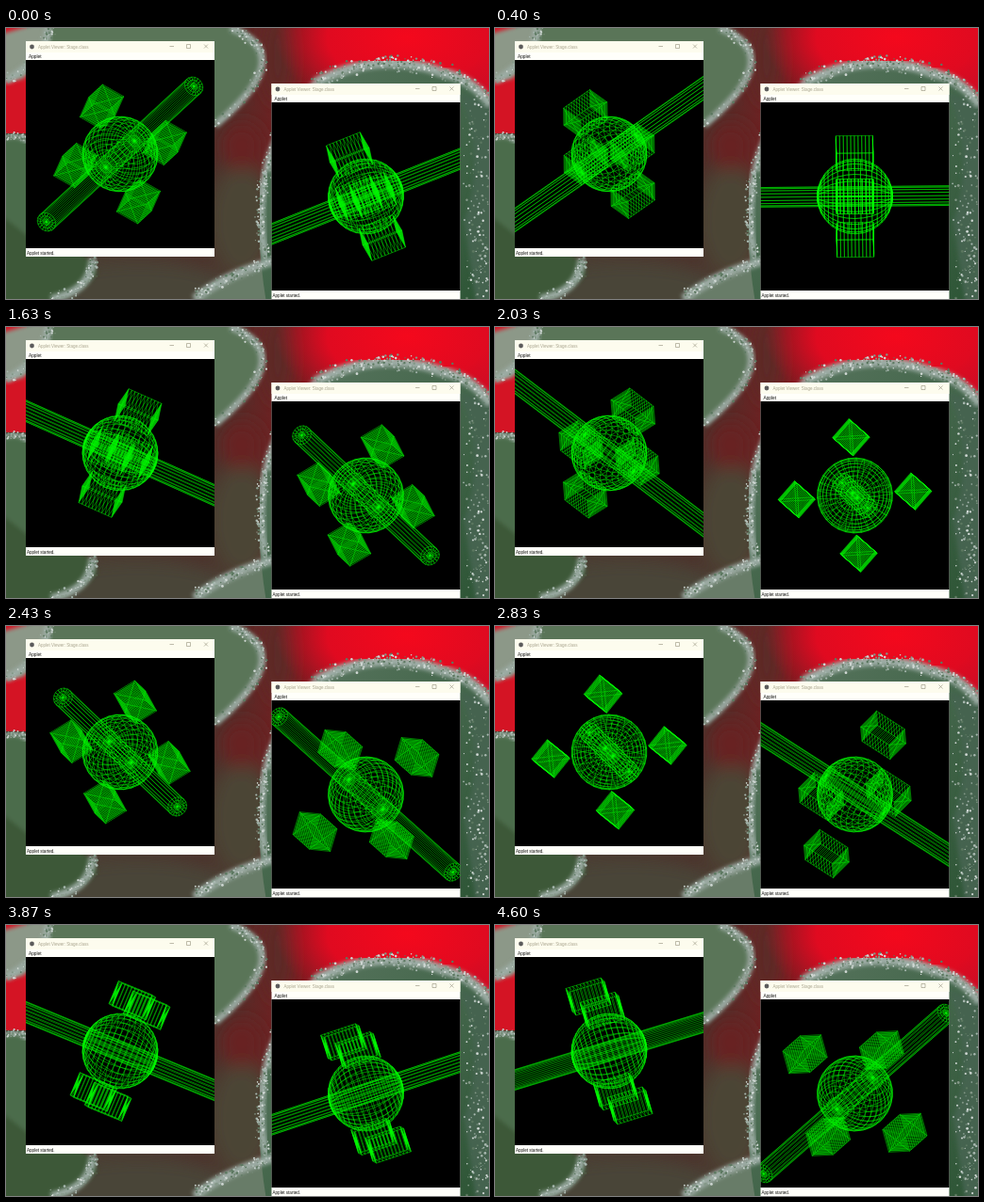
Recreate the animation shown at these times as an HTML page. Size 512 by 288 pixels, loop 4.67 s.

```html
<!DOCTYPE html>
<html>
<head>
<meta charset="utf-8">
<style>
html, body { margin: 0; width: 100%; height: 100%; overflow: hidden; background: #3c2a22; }
svg { display: block; width: 100vw; height: 100vh; }
text { font-family: "Liberation Sans", Arial, sans-serif; }
.wire { fill: none; stroke: #00f800; stroke-width: .48; }
</style>
</head>
<body>
<svg viewBox="0 0 512 288" preserveAspectRatio="none">
  <defs>
    <linearGradient id="back" x1="0" x2="1" y1="0" y2="0">
      <stop offset="0" stop-color="#4a4234"/>
      <stop offset=".45" stop-color="#4c302a"/>
      <stop offset=".6" stop-color="#7a1c20"/>
      <stop offset="1" stop-color="#d00c24"/>
    </linearGradient>
    <radialGradient id="red">
      <stop offset="0" stop-color="#f4081c"/>
      <stop offset=".6" stop-color="#e00a20"/>
      <stop offset="1" stop-color="#d00c24" stop-opacity="0"/>
    </radialGradient>
    <linearGradient id="leaf" x1="0" x2="1" y1="0" y2="1">
      <stop offset="0" stop-color="#5c7862"/>
      <stop offset="1" stop-color="#2c5434"/>
    </linearGradient>
    <filter id="soft"><feGaussianBlur stdDeviation="9"/></filter>
    <filter id="mild"><feGaussianBlur stdDeviation="2"/></filter>
    <clipPath id="view"><rect x="-100" y="-100" width="200" height="200"/></clipPath>
  </defs>
  <rect width="512" height="288" fill="url(#back)"/>
  <g filter="url(#soft)">
    <ellipse cx="250" cy="205" rx="36" ry="60" fill="#4c4434"/>
    <ellipse cx="250" cy="125" rx="24" ry="26" fill="#682420"/>
    <ellipse cx="140" cy="278" rx="100" ry="30" fill="#484438"/>
    <ellipse cx="288" cy="30" rx="16" ry="50" fill="#5c2c28"/>
  </g>
  <ellipse cx="425" cy="10" rx="140" ry="84" fill="url(#red)"/>
  <rect width="22" height="112" fill="#d41424"/>
  <g filter="url(#mild)">
    <path d="M42 -4H238Q312 28 222 103H42Z" fill="#5a7458"/>
    <path d="M-4 6L30 -4H47Q44 32 18 54L-4 58Z" fill="#8c9888"/>
    <path d="M-4 116Q14 110 26 122V238L-4 240Z" fill="#4c6c4c"/>
    <path d="M-4 200L30 226Q100 240 96 262Q76 284 48 292H-4Z" fill="#3c5838"/>
    <path d="M196 292Q232 262 290 246V292Z" fill="#687c68"/>
  </g>
  <path d="M276 292Q262 210 276 152Q290 92 330 58Q392 24 460 46Q496 54 516 82V292Z" fill="url(#leaf)"/>
  <path d="M482 70Q508 140 486 205L498 292H516V80Z" fill="#446450" filter="url(#mild)"/>
  <g id="frost"></g>
  <g id="wins"></g>
</svg>
<script>
const TAU = Math.PI * 2, RAD = Math.PI / 180;
const NS = "http://www.w3.org/2000/svg";
const LOOP = 4670, STEP = 100 / 3, LAST = 138, SPEED = 0.0577;

let seed = 7;
function rnd() {
  seed = (seed * 16807) % 2147483647;
  return seed / 2147483647;
}

// Specks scattered along a quadratic curve
function specks(x0, y0, x1, y1, x2, y2, n, spread) {
  const tones = ["#d0d8d4", "#a8b8b0", "#849888", "#5c7860"];
  let out = "";
  for (let i = 0; i < n; i++) {
    const t = rnd(), u = 1 - t;
    const x = u * u * x0 + 2 * u * t * x1 + t * t * x2 + (rnd() + rnd() - 1) * spread;
    const y = u * u * y0 + 2 * u * t * y1 + t * t * y2 + (rnd() + rnd() - 1) * spread;
    out += `<circle cx="${x.toFixed(1)}" cy="${y.toFixed(1)}" r="${(.4 + rnd()).toFixed(1)}" fill="${tones[i % 4]}"/>`;
  }
  return out;
}
// A frosted leaf edge: pale band under specks
function rim(x0, y0, x1, y1, x2, y2, n, spread) {
  return `<path d="M${x0} ${y0}Q${x1} ${y1} ${x2} ${y2}" fill="none" stroke="#9cac a4" style="stroke:#9caca4" stroke-width="${spread}" filter="url(#mild)"/>`
    .replace('stroke="#9cac a4" ', "") + specks(x0, y0, x1, y1, x2, y2, n, spread);
}
document.getElementById("frost").innerHTML =
  specks(500, 85, 500, 190, 504, 285, 200, 18) +
  rim(276, 245, 264, 200, 276, 152, 130, 8) +
  rim(276, 152, 290, 92, 330, 58, 110, 8) +
  rim(328, 58, 392, 24, 460, 46, 220, 10) +
  rim(458, 46, 496, 54, 514, 82, 120, 10) +
  rim(45, 0, 44, 32, 0, 56, 110, 8) +
  rim(238, 0, 312, 28, 222, 103, 130, 7) +
  rim(0, 116, 14, 110, 24, 122, 50, 5) +
  rim(92, 245, 90, 280, 48, 288, 90, 8) +
  rim(200, 288, 232, 262, 285, 247, 130, 9);

const wins = [
  { x: 121, y: 134, start: 22.4 },
  { x: 381.5, y: 179, start: 66.4 }
];

function frame() {
  return `<rect x="-100" y="-120" width="200" height="229" fill="#fffffa"/>
    <rect x="-100" y="-120" width="200" height="12" fill="#fdfcee"/>
    <circle cx="-93.5" cy="-114" r="2.4" fill="#5c5c5c"/>
    <g font-size="4.6">
      <text x="-87" y="-112.2" font-size="4.5" fill="#aaa690">Applet Viewer: Stage.class</text>
      <text x="-97" y="-102.3" font-size="4.8" fill="#111">Applet</text>
      <text x="-99" y="106.5" fill="#111">Applet started.</text>
    </g>
    <path d="M52.5 -114.5h4.5M70.5 -116.5h4v4h-4zM89 -116.5l4 4m0 -4l-4 4" fill="none" stroke="#94907c" stroke-width=".6"/>
    <rect x="-100" y="-100" width="200" height="200" fill="#000"/>
    <g clip-path="url(#view)"><path class="wire"/></g>`;
}

const holder = document.getElementById("wins");
for (const w of wins) {
  const g = document.createElementNS(NS, "g");
  g.setAttribute("transform", `translate(${w.x} ${w.y})`);
  g.innerHTML = frame();
  holder.appendChild(g);
  w.wire = g.querySelector(".wire");
}

function scene(a) {
  const c = Math.cos(a), s = Math.sin(a);
  let d = "";

  // Spin about z, then turn about y and x; flat projection
  const pt = (x, y, z) => {
    const u = x * c + y * s, v = y * c - x * s;
    return (u * c + z * s).toFixed(1) + " " + (u * s * s + v * c - z * s * c).toFixed(1);
  };
  const line = (p, q) => { d += "M" + p + "L" + q; };
  const curve = (n, f) => {
    for (let i = 0; i <= n; i++) d += (i ? "L" : "M") + f(i / n);
  };

  function sphere(r) {
    for (let i = 0; i < 30; i++) {
      const m = i / 30 * TAU;
      curve(14, t => {
        const k = t * Math.PI, q = r * Math.sin(k);
        return pt(q * Math.cos(m), q * Math.sin(m), r * Math.cos(k));
      });
    }
    for (let i = 1; i < 20; i++) {
      const k = i / 20 * Math.PI, q = r * Math.sin(k), z = r * Math.cos(k);
      curve(30, t => pt(q * Math.cos(t * TAU), q * Math.sin(t * TAU), z));
    }
  }

  // Closed prism along z; four sides give a block standing on its corner
  function prism(x, y, r, h, sides, stacks, rings) {
    const at = (t, z, q) => pt(x + q * Math.cos(t * TAU), y + q * Math.sin(t * TAU), z);
    for (let i = 0; i < sides; i++) {
      line(at(i / sides, -h, r), at(i / sides, h, r));
      for (const z of [-h, h]) line(pt(x, y, z), at(i / sides, z, r));
    }
    for (let i = 0; i <= stacks; i++) curve(sides, t => at(t, h * (2 * i / stacks - 1), r));
    for (const z of [-h, h])
      for (let i = 1; i < rings; i++) curve(sides, t => at(t, z, r * i / rings));
  }

  sphere(40);
  prism(0, 0, 10.5, 205, 18, 1, 3);
  const gap = 61 - 15 * s;
  for (const k of [-gap, gap]) {
    prism(k, 0, 18.5, 19.5, 4, 10, 10);
    prism(0, k, 18.5, 19.5, 4, 10, 10);
  }
  return d;
}

let shown = -1;
function draw(now) {
  const t = now % LOOP;
  const n = Math.min(LAST, Math.floor((t + 5) / STEP));
  if (n !== shown) {
    shown = n;
    for (const w of wins)
      w.wire.setAttribute("d", scene((w.start + SPEED * n * STEP) * RAD));
  }
  requestAnimationFrame(() => draw(performance.now()));
}
draw(performance.now());
</script>
</body>
</html>
```
